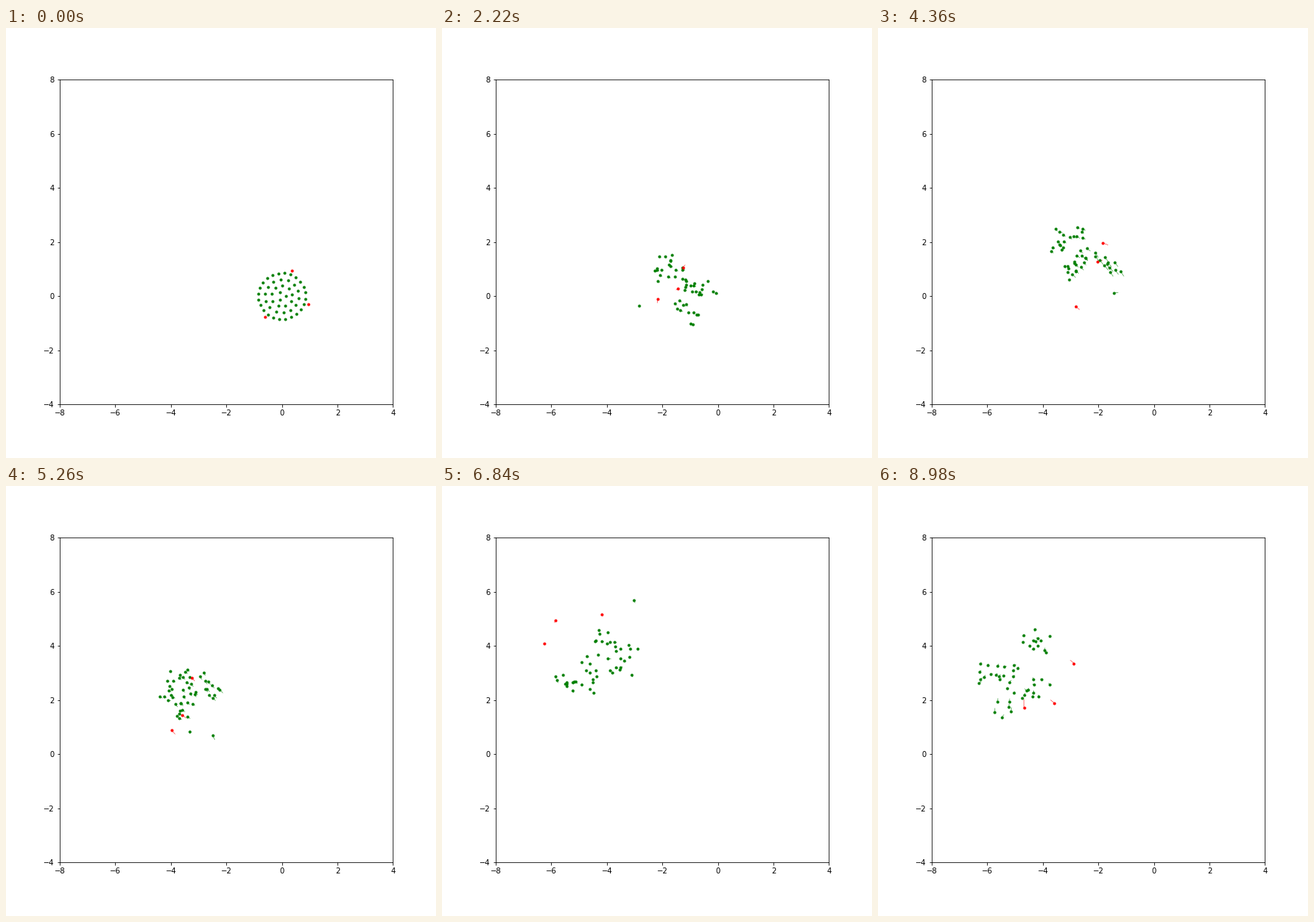
A matplotlib script that plays this animation: 576 by 576 pixels, repeating every 9 s.

```python
import numpy as np
import matplotlib.pyplot as plt
from matplotlib.animation import FuncAnimation

FRAMES, STEP = 450, 20
TAIL = 0.1  # seconds of motion shown behind each dot

rng = np.random.default_rng(4)


def ring(count, radius, phase):
    turn = np.radians(phase) + 2 * np.pi * np.arange(count) / count
    return radius * np.exp(1j * turn)


def hermite(times, points, t):
    """Smooth path through complex points, starting from rest."""
    slopes = np.gradient(points, times, axis=1)
    slopes[:, 0] = 0
    k = int(np.clip(np.searchsorted(times, t, side="right") - 1, 0, len(times) - 2))
    span = times[k + 1] - times[k]
    u = (t - times[k]) / span
    return ((1 + 2 * u) * (1 - u) ** 2 * points[:, k]
            + u * (1 - u) ** 2 * span * slopes[:, k]
            + u * u * (3 - 2 * u) * points[:, k + 1]
            + u * u * (u - 1) * span * slopes[:, k + 1])


# Starting disc: four rings of dots
disc = np.concatenate([ring(3, 0.145, 0), ring(9, 0.375, 9),
                       ring(14, 0.607, 18), ring(24, 0.852, 8.5)])
strays = [49, 38]

# Dots that fly on their own: three leaders, then two strays
leaders = [
    [.95 - .30j, -1.7 - .1j, -1.45 + .28j, -.67 + 1.22j,
     -3.25 + 2.82j, -4.19 + 5.17j, -4.73 + 5.17j, -4.68 + 1.72j],
    [.36 + .95j, -.48 + 1.45j, -1.26 + 1.06j, -1.80 - .76j,
     -3.98 + .89j, -6.24 + 4.09j, -5.27 + 3.29j, -3.58 + 1.88j],
    [-.61 - .77j, -1.6 - 1.5j, -2.18 - .10j, -1.02 + 1.36j,
     -3.60 + 1.44j, -5.86 + 4.95j, -4.44 + 4.73j, -2.88 + 3.35j],
]
stray_paths = [
    [disc[49], .94 - .35j, -.08 + .12j, -.32 + .31j,
     -2.50 + .70j, -3.04 + 5.69j, -3.66 + 4.84j, -3.95 + 3.84j],
    [disc[38], -2.1 - .35j, -2.85 - .35j, -2.74 + .53j,
     -3.33 + .84j, -3.12 + 2.93j, -4.03 + 3.15j, -3.76 + 2.57j],
]
solo = np.array(leaders + stray_paths)
solo_times = np.array([0, 1.3, 2.22, 3.38, 5.26, 6.84, 7.76, 8.98])

# The rest fly in eight flocks, one per sector of the disc
flock_stops = np.array([
    [-1.40 - .27j, -2.37 + .59j, -3.60 + 1.36j, -5.22 + 2.46j, -5.16 + 2.99j, -5.38 + 1.75j],
    [-.94 + .23j, -1.83 + .31j, -3.47 + 1.86j, -4.49 + 2.57j, -4.65 + 2.66j, -4.92 + 2.27j],
    [-.83 - .76j, -.65 - .30j, -2.50 + 2.24j, -3.87 + 3.18j, -4.62 + 3.04j, -4.19 + 2.57j],
    [-.51 + .23j, -.97 + .17j, -2.82 + 2.74j, -3.20 + 3.82j, -3.68 + 3.65j, -3.95 + 4.17j],
    [-1.05 + .62j, -1.69 + .97j, -3.33 + 2.35j, -3.79 + 3.87j, -4.54 + 3.48j, -5.22 + 2.96j],
    [-1.83 + 1.44j, -1.96 + 1.86j, -3.39 + 2.85j, -4.19 + 4.26j, -4.78 + 3.98j, -4.60 + 4.10j],
    [-1.48 + .95j, -2.45 + 1.66j, -3.92 + 2.68j, -4.65 + 3.32j, -5.03 + 3.54j, -5.75 + 2.95j],
    [-2.20 + .81j, -2.90 + 1.36j, -4.14 + 2.22j, -5.54 + 2.77j, -5.35 + 3.46j, -6.10 + 2.95j],
])
flock_times = np.delete(solo_times, 1)
members = np.delete(disc, strays)
members = members[np.argsort(np.angle(members))].reshape(8, 6)
centres = members.mean(axis=1, keepdims=True)
flock_paths = np.hstack([centres, flock_stops])
offsets = members - centres
spin = rng.uniform(0.3, 1.0, offsets.shape) * rng.choice([-1, 1], offsets.shape)


def swarm(t):
    """Positions of the red and the green dots."""
    t = max(t, 0)
    alone = hermite(solo_times, solo, t)
    hub = hermite(flock_times, flock_paths, t)[:, None]
    size = 1 + 0.04 * t - 0.35 * np.sin(np.pi * t / 9)
    flock = hub + size * offsets * np.exp(1j * spin * t)
    return alone[:3], np.concatenate([flock.ravel(), alone[3:]])


fig, ax = plt.subplots(figsize=(8, 8), dpi=72)
fig.subplots_adjust(left=0.125, right=0.9, bottom=0.125, top=0.88)
ax.set(xlim=(-8, 4), ylim=(-4, 8))
colors = ("red", "green")
tails = [ax.plot([], [], "-", color=c, lw=0.5)[0] for c in colors]
dots = [ax.plot([], [], ".", color=c, ms=6, zorder=3 - i / 10)[0]
        for i, c in enumerate(colors)]


def update(frame):
    t = frame * STEP / 1000
    for dot, tail, now, past in zip(dots, tails, swarm(t), swarm(t - TAIL)):
        dot.set_data(now.real, now.imag)
        gap = np.full(now.shape, np.nan)
        tail.set_data(np.column_stack([now.real, past.real, gap]).ravel(),
                      np.column_stack([now.imag, past.imag, gap]).ravel())
    return tails + dots


anim = FuncAnimation(fig, update, frames=FRAMES, interval=STEP, repeat=True)
plt.show()
```
